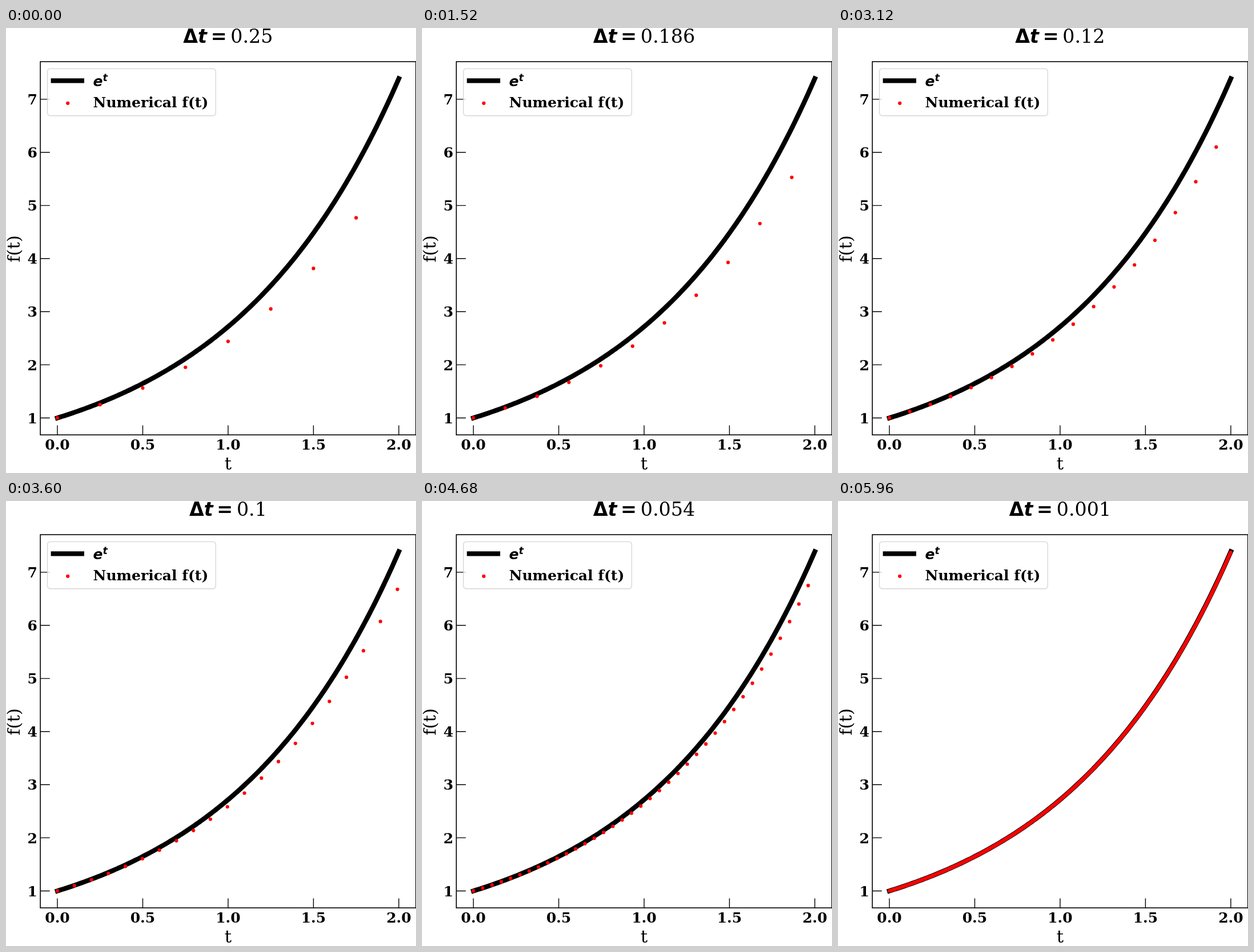
An HTML page for the animation above (6000 ms loop, 718x780 px).

```html
<!DOCTYPE html>
<html lang="en">
<head>
<meta charset="utf-8">
<title>Euler steps towards e^t</title>
<style>
  html, body { margin: 0; width: 100%; height: 100%; overflow: hidden; background: #fff; }
  svg { display: block; width: 718px; height: 780px; }
  text { font-family: "DejaVu Serif", serif; fill: #000; white-space: pre; }
  .tick { font-size: 25px; font-weight: bold; }
  .label { font-size: 30.56px; text-anchor: middle; }
  .title { font-size: 33.33px; text-anchor: middle; }
  .math { font-family: "DejaVu Sans", sans-serif; font-weight: bold; }
  .it { font-style: italic; }
  .line { fill: none; stroke: #000; stroke-width: 8.33; stroke-linecap: square; stroke-linejoin: round; }
  .dots { fill: none; stroke: #f00; stroke-width: 6.2; stroke-linecap: round; }
</style>
</head>
<body>
<svg viewBox="0 0 718 780">
  <path id="curve" class="line"/>
  <path id="dots" class="dots"/>
  <path id="ticks" stroke="#000" stroke-width="1.4"/>
  <rect x="60.1" y="59" width="657.7" height="654.2" fill="none" stroke="#000" stroke-width="1.6"/>
  <g id="labels" class="tick"></g>

  <text class="label" x="389" y="774">t</text>
  <text class="label" transform="translate(24 387) rotate(-90)">f(t)</text>

  <rect x="72.5" y="71.4" width="294.8" height="82.3" rx="5" fill="#fff" stroke="#ccc" stroke-width="1.4" opacity=".8"/>
  <path class="line" d="M82.8 92.4H132.8"/>
  <path class="dots" d="M108.2 131.8h0"/>
  <text class="math it" x="152.6" y="102" font-size="25">e<tspan dy="-9.5" font-size="17.5">t</tspan></text>
  <text class="tick" x="152.6" y="139">Numerical f(t)</text>

  <text class="title" x="388.9" y="26"><tspan class="math">Δ</tspan><tspan class="math it">t</tspan><tspan class="math" dx="6.67">=</tspan><tspan id="step" dx="6.67">0.25</tspan></text>
</svg>
<script>
  const FRAMES = 150, FRAME_MS = 40, FIRST = 0.25, LAST = 0.001, END = 2;
  const el = id => document.getElementById(id);
  const px = t => 90 + t * 298.95;
  const py = v => 683.46 - (v - 1) * 93.09;
  const point = (t, v) => px(t).toFixed(2) + " " + py(v).toFixed(2);

  function addLabel(text, x, y, anchor) {
    const node = document.createElementNS("http://www.w3.org/2000/svg", "text");
    node.setAttribute("x", x);
    node.setAttribute("y", y);
    node.setAttribute("text-anchor", anchor);
    node.textContent = text;
    el("labels").append(node);
  }

  function drawAxes() {
    let d = "";
    for (let t = 0; t <= END; t += 0.5) {
      d += `M${px(t)} 713.2v-16.7`;
      addLabel(t.toFixed(1), px(t), 739, "middle");
    }
    for (let v = 1; v <= 7; v++) {
      d += `M60.1 ${py(v)}h16.7`;
      addLabel(v, 55, py(v) + 9.2, "end");
    }
    el("ticks").setAttribute("d", d);
  }

  function drawCurve() {
    const points = [];
    for (let i = 0; i <= 200; i++) {
      const t = END * i / 200;
      points.push(point(t, Math.exp(t)));
    }
    el("curve").setAttribute("d", "M" + points.join("L"));
  }

  // Forward Euler for f' = f, f(0) = 1, on [0, END)
  function drawSteps(frame) {
    const dt = FIRST + (LAST - FIRST) * frame / (FRAMES - 1);
    const count = Math.ceil(END / dt - 1e-9);
    let d = "";
    for (let k = 0, f = 1; k < count; k++, f *= 1 + dt) d += `M${point(k * dt, f)}h0`;
    el("dots").setAttribute("d", d);
    el("step").textContent = +dt.toFixed(3);
  }

  drawAxes();
  drawCurve();

  const start = performance.now();
  let shown = -1;
  function tick() {
    const frame = Math.floor((performance.now() - start) / FRAME_MS) % FRAMES;
    if (frame !== shown) drawSteps(shown = frame);
    requestAnimationFrame(tick);
  }
  tick();
</script>
</body>
</html>
```
